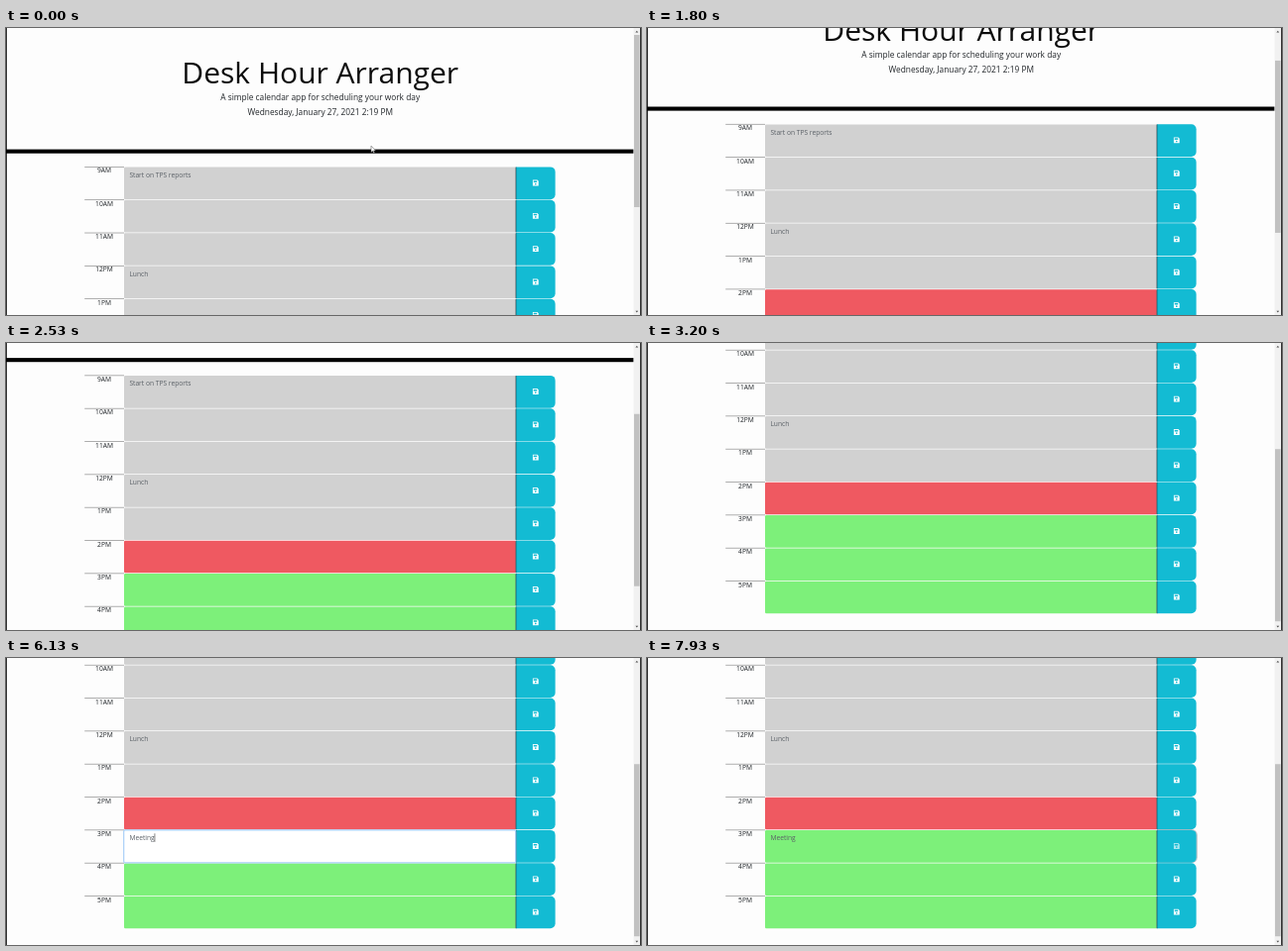
An HTML page with a canvas that plays this animation: 640x290 px, repeating every 8 s.

```html
<!DOCTYPE html>
<html lang="en">
<head>
<meta charset="utf-8">
<title>Day planner</title>
<style>
  html, body { margin: 0; width: 100%; height: 100%; overflow: hidden; background: #fdfdfd; }
  canvas { display: block; width: 640px; height: 290px; }
</style>
</head>
<body>
<canvas id="stage"></canvas>
<script>
const W = 640, H = 290, LOOP = 8000;
const FONT = '"Open Sans", "Noto Sans", sans-serif';
const PAGE = '#fdfdfd', TEAL = '#13bbd3';
const FILL = { past: '#d1d1d1', now: '#ef5961', next: '#7df07a' };
const MID = 316.7, TOP = 140.2, ROW = 100 / 3;
const HOURS = ['9AM', '10AM', '11AM', '12PM', '1PM', '2PM', '3PM', '4PM', '5PM'];
const NOTES = { 0: 'Start on TPS reports', 3: 'Lunch' };
const EDIT = 6, WORD = 'Meeting';
const KEYS = [5400, 5660, 5730, 5800, 5890, 5990, 6060];
const FOCUS = 4660, SAVE = 7200;
const SCROLL = [[1420, 0], [1800, 43], [2530, 107.4], [3130, 166.5]];

const canvas = document.getElementById('stage');
const ctx = canvas.getContext('2d');
const dpr = window.devicePixelRatio || 1;
canvas.width = W * dpr;
canvas.height = H * dpr;

const ramp = (t, start, length) => Math.min(1, Math.max(0, (t - start) / length));

function scrollAt(t) {
  let y = 0;
  for (let i = 1; i < SCROLL.length; i++) {
    const [t0, y0] = SCROLL[i - 1], [t1, y1] = SCROLL[i];
    y += (y1 - y0) * ramp(t, t0, t1 - t0);
  }
  return y;
}

function rect(x, y, w, h, color) {
  ctx.fillStyle = color;
  ctx.fillRect(x, y, w, h);
}

function round(x, y, w, h, r, color) {
  ctx.fillStyle = color;
  ctx.beginPath();
  ctx.roundRect(x, y, w, h, r);
  ctx.fill();
}

function poly(points, color) {
  ctx.fillStyle = color;
  ctx.beginPath();
  points.forEach(([x, y]) => ctx.lineTo(x, y));
  ctx.closePath();
  ctx.fill();
}

function text(str, x, y, size, color, align = 'center') {
  ctx.font = `${size}px ${FONT}`;
  ctx.fillStyle = color;
  ctx.textAlign = align;
  ctx.fillText(str, x, y);
}

function header() {
  text('Desk Hour Arranger', MID, 56, 30, '#0c0c0c');
  text('A simple calendar app for scheduling your work day', MID, 73, 25 / 3, '#212529');
  text('Wednesday, January 27, 2021 2:19 PM', MID, 88, 25 / 3, '#212529');
  rect(0, 122.6, 632.6, 4.1, '#000');
}

function diskIcon(x, y, alpha) {
  ctx.globalAlpha = alpha;
  poly([[x - 2.9, y - 2.9], [x + 1.7, y - 2.9], [x + 2.9, y - 1.7],
        [x + 2.9, y + 2.9], [x - 2.9, y + 2.9]], '#fff');
  ctx.globalAlpha = 1;
  rect(x - 2.1, y - 2.1, 3.5, 1.6, TEAL);
  ctx.fillStyle = TEAL;
  ctx.beginPath();
  ctx.arc(x, y + 1.1, 0.85, 0, 7);
  ctx.fill();
}

function saveButton(y, pressed) {
  if (pressed) round(514, y - 0.7, 40.8, ROW + 1, [0, 6, 6, 0], `rgba(90,110,125,${0.4 * pressed})`);
  round(514, y + 0.2, 39.6, ROW - 0.6, [0, 5, 5, 0], TEAL);
  rect(513.6, y + 0.3, 0.7, ROW - 0.7, '#14343a');
  diskIcon(533.8, y + 16.3, 1 - 0.35 * pressed);
}

function caret(t, x, y) {
  const last = KEYS.reduce((a, k) => (k <= t ? k : a), FOCUS);
  if ((t - last) % 1060 < 530) rect(x, y + 3.6, 0.6, 8.6, '#333');
}

function row(i, t) {
  const y = TOP + i * ROW;
  const editing = i === EDIT && t >= FOCUS && t < SAVE;
  const kind = i < 5 ? 'past' : i === 5 ? 'now' : 'next';
  const note = i === EDIT ? WORD.slice(0, KEYS.filter(k => k <= t).length) : NOTES[i] || '';

  rect(79.2, y - 0.2, 39.8, 0.7, '#8c8c8c');
  text(HOURS[i], 99, y + 6.2, 20 / 3, '#212529');
  round(119, y + 0.4, 394.8, ROW - 0.8, 1.2, editing ? '#fff' : FILL[kind]);
  text(note, 124.4, y + 10.4, 20 / 3, '#5a6066', 'left');
  if (editing) caret(t, 124.4 + ctx.measureText(note).width, y);
  saveButton(y, i === EDIT ? ramp(t, SAVE, 150) : 0);
}

function focusRing(t) {
  const glow = ramp(t, FOCUS, 200) * (1 - ramp(t, SAVE, 150));
  if (!glow) return;
  const y = TOP + EDIT * ROW;
  ctx.globalAlpha = glow;
  ctx.strokeStyle = '#a9cff8';
  ctx.lineWidth = 1.2;
  ctx.beginPath();
  ctx.roundRect(118.7, y + 0.1, 395, ROW - 0.2, 1.5);
  ctx.stroke();
  ctx.globalAlpha = 1;
}

function scrollbar(scroll) {
  rect(632.6, 0, 6.6, H, '#f1f1f1');
  rect(633, 7 + scroll * 0.602, 5.6, 174, '#c1c1c1');
  poly([[634.4, 4.4], [637.2, 4.4], [635.8, 2.8]], '#505050');
  poly([[634.4, 285.8], [637.2, 285.8], [635.8, 287.4]], '#505050');
}

function pointer(t) {
  if (t > 270) return;
  const k = ramp(t, 60, 210), x = 368 + 4 * k, y = 119.2 + 19 * k;
  const shape = [[x, y], [x, y + 6.4], [x + 1.5, y + 5], [x + 2.6, y + 7.3],
                 [x + 3.5, y + 6.8], [x + 2.5, y + 4.7], [x + 4.5, y + 4.6]];
  poly(shape, '#fff');
  ctx.strokeStyle = '#444';
  ctx.lineWidth = 0.5;
  ctx.stroke();
}

function draw(t) {
  const scroll = scrollAt(t);
  ctx.setTransform(dpr, 0, 0, dpr, 0, 0);
  rect(0, 0, W, H, PAGE);
  ctx.save();
  ctx.translate(0, -scroll);
  header();
  HOURS.forEach((_, i) => row(i, t));
  focusRing(t);
  ctx.restore();
  scrollbar(scroll);
  rect(0, 0, 0.8, H, '#000');
  rect(639.2, 0, 0.8, H, '#000');
  pointer(t);
}

const start = performance.now();
function tick() {
  draw((performance.now() - start) % LOOP);
  requestAnimationFrame(tick);
}
tick();
</script>
</body>
</html>
```
